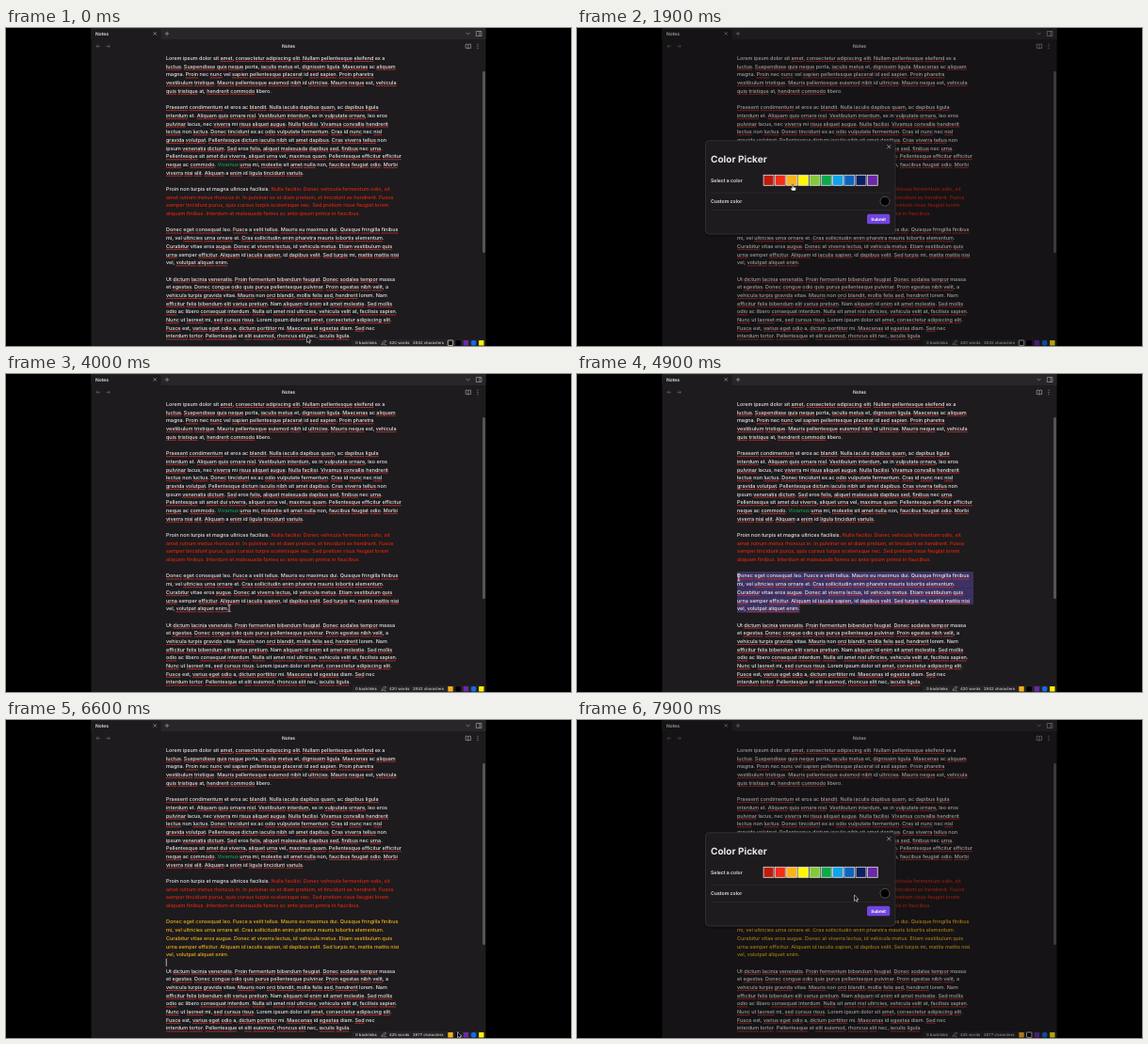
Recreate the animation shown at these times as an HTML page. Size 600x338 px, loop 8000 ms.

```html
<!DOCTYPE html>
<html lang="en">
<head>
<meta charset="utf-8">
<title>Notes</title>
<style>
html, body { margin: 0; width: 100%; height: 100%; overflow: hidden; background: #000; }
svg { display: block; width: 100vw; height: 100vh; }
text { font-family: Inter, "Open Sans", sans-serif; text-rendering: geometricPrecision; fill: #e8e6e8; }
.body { font-size: 5.45px; font-weight: 500; }
.ui { font-size: 4.9px; }
.status { font-size: 4.2px; font-weight: 500; fill: #d0ced0; }
.menu { font-size: 4.4px; font-weight: 500; }
.label { font-size: 5.15px; font-weight: 600; }
.icon { fill: none; stroke: #b4b2b5; stroke-width: .6; }
.spell { stroke: #d0322c; stroke-width: 1; stroke-dasharray: 1.2 .3; }
.done text { fill: #f2b01c; }
.done .spell { display: none; }
</style>
</head>
<body>
<svg id="stage" viewBox="0 0 600 338">
  <rect width="600" height="338" fill="#000"/>
  <rect x="90.5" width="419" height="338" fill="#1d1b1d"/>
  <rect x="90.5" width="419" height="12" fill="#292629"/>
  <path d="M90.5 12V2Q90.5 1 92 1H163Q164.5 1 164.5 3V12Z" fill="#1d1b1d"/>
  <text class="ui" x="95" y="7.9" font-weight="600">Notes</text>
  <text class="ui" x="300" y="21.2" text-anchor="middle" font-weight="600">Notes</text>
  <path class="icon" d="M156.5 4.2l3.4 3.4m0-3.4l-3.4 3.4M168.800 6h4.400M171 3.800v4.400M488.600 5l1.900 1.900L492.400 5M499.300 3.500h5.600v5h-5.600zM503 3.500v5"/>
  <path class="icon" d="M488.200 17.200q1.600-.5 2.700.5q1.100-1 2.700-.5v4.300q-1.600-.5-2.700.5q-1.100-1-2.700-.5zM490.900 17.700v4.300"/>
  <path class="icon" stroke-linecap="round" style="stroke-width:1" d="M501 17.200v0M501 19.400v0M501 21.600v0"/>
  <path class="icon" style="stroke:#777478" d="M100 19.400h-4m1.700-1.700l-1.700 1.700l1.700 1.700M106.300 19.400h4m-1.700-1.700l1.700 1.700l-1.700 1.700"/>
  <rect x="506" y="46" width="3" height="193" rx="1.2" fill="#565356"/>
  <g id="sel" fill="#3d3263"></g>
  <g id="plain"></g>
  <g id="para"></g>
  <rect id="caret" x="169.8" y="253.5" width=".8" height="8.3" fill="#dcdadc"/>
  <rect x="367" y="331" width="142.500" height="7" fill="#252225"/>
  <text class="status" x="371" y="336.3">0 backlinks</text>
  <path class="icon" d="M399 336.600l.5-1.700l3-3l1.200 1.200l-3 3zM401.500 336.700h2.400"/>
  <text class="status" id="words" x="407" y="336.3"></text>
  <text class="status" id="chars" x="432" y="336.3"></text>
  <g id="dock"></g>
  <g id="menu">
    <rect x="172.5" y="216.3" width="128" height="98" rx="2.5" fill="#29262d" fill-opacity=".95" stroke="#57535a" stroke-width=".5"/>
    <rect id="hot" x="173" width="127" height="8.7" rx="1" fill="#0b56cf"/>
  </g>
  <g id="modal">
    <rect x="90.5" width="419" height="338" fill="#060606" opacity=".32"/>
    <rect x="135.5" y="119" width="204" height="103" rx="5" fill="#000" opacity=".25"/>
    <rect x="136.5" y="119.7" width="201.5" height="99.3" rx="4" fill="#1d1b1d" stroke="#454246" stroke-width=".6"/>
    <path class="icon" style="stroke:#d0ced0" d="M329.300 124.200l4 4m0-4l-4 4"/>
    <text x="142" y="142.9" font-size="10.05" font-weight="700">Color Picker</text>
    <text class="label" x="142" y="163.8">Select a color</text>
    <text class="label" x="142" y="186.2">Custom color</text>
    <path d="M142 175.300H333M142 193.500H333" stroke="#363337" stroke-width=".5"/>
    <circle cx="327" cy="184.2" r="5" fill="#000" stroke="#59565a" stroke-width=".9"/>
    <rect x="308" y="197.8" width="24.3" height="10.5" rx="1.9" fill="#7145e0"/>
    <text x="320.1" y="204.7" font-size="4.5" font-weight="700" text-anchor="middle" style="fill:#fff">Submit</text>
  </g>
  <g id="cursor">
    <path d="M0 0V6.300L1.500 5L2.500 7.200L3.500 6.800L2.600 4.600H4.500Z" fill="#000" stroke="#fff" stroke-width=".55"/>
    <path d="M-.7 0Q0-.8.7 0V2.500L3.200 3.100Q3.800 3.400 3.600 4.300L3 6.500H-.7L-2.400 4.100Q-2.300 3.300-1.600 3.500L-.7 4.200Z" fill="#fff" stroke="#111" stroke-width=".5"/>
    <path d="M-1.500-3.500Q0-3.500 0-2.700Q0-3.500 1.500-3.500M0-2.700V2.700M-1.500 3.500Q0 3.500 0 2.700Q0 3.500 1.500 3.500" fill="none" stroke="#eee" stroke-width=".75"/>
  </g>
</svg>
<script>
const LOOP = 8000, LEFT = 170, RIGHT = 421, PITCH = 8.69;
const RED_FROM = 16, RED_TO = 19, PARA = 21, PARA_END = 25, ORANGE = '#f5b01c';
const $ = id => document.getElementById(id);
const rowTop = row => 27.6 + row * PITCH;

const lines = `Lorem ipsum dolor sit amet, consectetur adipiscing elit. Nullam pellentesque eleifend ex a
luctus. Suspendisse quis neque porta, iaculis metus et, dignissim ligula. Maecenas ac aliquam
magna. Proin nec nunc vel sapien pellentesque placerat id sed sapien. Proin pharetra
vestibulum tristique. Mauris pellentesque euismod nibh id ultricies. Mauris neque est, vehicula
quis tristique at, hendrerit commodo libero.

Praesent condimentum et eros ac blandit. Nulla iaculis dapibus quam, ac dapibus ligula
interdum et. Aliquam quis ornare nisl. Vestibulum interdum, ex in vulputate ornare, leo eros
pulvinar lacus, nec viverra mi risus aliquet augue. Nulla facilisi. Vivamus convallis hendrerit
lectus non luctus. Donec tincidunt ex ac odio vulputate fermentum. Cras id nunc nec nisl
gravida volutpat. Pellentesque dictum iaculis nibh sit amet dapibus. Cras viverra tellus non
ipsum venenatis dictum. Sed eros felis, aliquet malesuada dapibus sed, finibus nec urna.
Pellentesque sit amet dui viverra, aliquet urna vel, maximus quam. Pellentesque efficitur efficitur
neque ac commodo. |Vivamus| urna mi, molestie sit amet nulla non, faucibus feugiat odio. Morbi
viverra nisi elit. Aliquam a enim id ligula tincidunt variuls.

Proin non turpis et magna ultrices facilisis. |Nulla facilisi. Donec vehicula fermentum odio, sit
|amet rutrum metus rhoncus in. In pulvinar ex et diam pretium, et tincidunt ex hendrerit. Fusce
|semper tincidunt purus, quis cursus turpis scelerisque nec. Sed pretium risus feugiat lorem
|aliquam finibus. Interdum et malesuada fames ac ante ipsum primis in faucibus.

Donec eget consequat leo. Fusce a velit tellus. Mauris eu maximus dui. Quisque fringilla finibus
mi, vel ultricies urna ornare et. Cras sollicitudin enim pharetra mauris lobortis elementum.
Curabitur vitae eros augue. Donec at viverra lectus, id vehicula metus. Etiam vestibulum quis
urna semper efficitur. Aliquam id iaculis sapien, id dapibus velit. Sed turpis mi, mattis mattis nisi
vel, volutpat aliquet enim.

Ut dictum lacinia venenatis. Proin fermentum bibendum feugiat. Donec sodales tempor massa
et egestas. Donec congue odio quis purus pellentesque pulvinar. Proin egestas nibh velit, a
vehicula turpis gravida vitae. Mauris non orci blandit, mollis felis sed, hendrerit lorem. Nam
efficitur felis bibendum elit varius pretium. Nam aliquam id enim sit amet molestie. Sed mollis
odio ac libero consequat interdum. Nulla sit amet nisl ultricies, vehicula velit at, facilisis sapien.
Nunc ut laoreet mi, sed cursus risus. Lorem ipsum dolor sit amet, consectetur adipiscing elit.
Fusce est, varius eget odio a, dictum porttitor mi. Maecenas id egestas diam. Sed nec
interdum tortor. Pellentesque et elit euismod, rhoncus elit nec, iaculis ligula.`.split('\n');
const known = new Set('lorem ipsum dolor sit a at et in id ex ac ut non leo eros magna est mi vel nec porta lacus libero semper diam ante primis vitae massa nam'.split(' '));

function add(parent, tag, attrs = {}, text) {
  const el = document.createElementNS('http://www.w3.org/2000/svg', tag);
  for (const k in attrs) el.setAttribute(k, attrs[k]);
  if (text) el.textContent = text;
  return parent.appendChild(el);
}

lines.forEach((line, row) => {
  if (!line) return;
  const parent = $(row >= PARA && row <= PARA_END ? 'para' : 'plain');
  const red = row >= RED_FROM && row <= RED_TO;
  const y = 34 + row * PITCH;
  const text = add(parent, 'text', { class: 'body', x: LEFT, y });
  let from = 0;
  const marks = [];
  line.split('|').forEach((part, i) => {
    if (!part) return;
    const span = add(text, 'tspan', {}, part);
    if (i % 2) span.style.fill = red ? '#e0240e' : '#12a152';
    else if (!red) for (const m of part.matchAll(/\w+/g))
      if (!known.has(m[0].toLowerCase())) marks.push([from + m.index, from + m.index + m[0].length - 1]);
    from += part.length;
  });
  for (const [a, b] of marks) add(parent, 'line', {
    class: 'spell', y1: y + 1.5, y2: y + 1.5,
    x1: text.getStartPositionOfChar(a).x, x2: text.getEndPositionOfChar(b).x
  });
});

const bars = [];
for (let r = PARA; r <= PARA_END; r++) bars.push(add($('sel'), 'rect', { y: rowTop(r), height: PITCH + .05 }));

const dock = ['#000', '#000', '#6a2aa6', '#1668e8', '#fff200'].map((fill, i) =>
  add($('dock'), 'rect', { x: 469.3 + i * 8.2, y: 332, width: 5.4, height: 5.4, rx: i == 3 ? 1.7 : .5, fill, 'stroke-width': .8 }));

['#bd1c0c', '#f62c13', '#fbb417', '#fff800', '#82c93c', '#0fa84c', '#0da6ea', '#0c66bd', '#0c1f60', '#6a28a4'].forEach((fill, i) =>
  add($('modal'), 'rect', { x: 198.1 + i * 12.25, y: 156.3, width: 10.9, height: 11, fill, stroke: '#e4e0e4', 'stroke-width': .8 }));

const items = [
  [221.5, 'Look up “Donec eget consequat leo. Fusce a velit...”'],
  [233, 'Cut'], [241, 'Copy'], [249, 'Paste'], [257, 'Paste as plain text'], [265, 'Select all'],
  [277, 'Bookmark this block...'], [285, 'Extract current selection...'],
  [297, 'Search for “Donec eget consequat leo. Fusce a velit...”'], [308.7, 'Color Text']
];
for (const [y, label] of items) add($('menu'), 'text', { class: 'menu', x: 177, y: y + 1.6 }, label);
for (const y of [227.3, 271, 291, 303]) add($('menu'), 'path', { d: `M176 ${y}H297`, stroke: '#4b474f', 'stroke-width': .5 });

// time, x, y
const path = [
  [0, 319.5, 328], [100, 319.5, 328], [780, 472, 333], [1000, 472, 333], [1700, 229, 166.5],
  [1950, 229, 166.5], [2600, 321, 202], [3200, 323, 202], [3400, 323, 202], [3950, 237, 249],
  [4050, 237, 249], [4500, 171.8, 216.5], [5000, 171.8, 216.5], [5500, 196, 308],
  [5700, 196, 308], [5800, 313, 291], [6500, 479.5, 331.5], [7300, 479.5, 332],
  [7750, 294.5, 186], [LOOP, 294.5, 186]
];
// time, shape: 0 arrow, 1 hand, 2 text beam
const shapes = [[0, 0], [1650, 1], [2000, 0], [2500, 1], [2800, 2], [5000, 0]];

function pointer(t) {
  const i = path.findIndex(p => p[0] > t), [a, x, y] = path[i - 1], [b, X, Y] = path[i];
  const u = (t - a) / (b - a), e = u * u * (3 - 2 * u);
  return [x + (X - x) * e, y + (Y - y) * e];
}
const show = (el, on) => { el.style.display = on ? '' : 'none'; };

function drawSelection(t, x, y) {
  const on = t >= 4050 && t < 5850;
  show($('sel'), on);
  if (!on) return;
  const top = t > 4500 ? PARA : Math.max(PARA, Math.min(PARA_END, Math.floor((y - 27.6) / PITCH)));
  bars.forEach((bar, i) => {
    const row = PARA + i, end = row == PARA_END ? 236.7 : RIGHT;
    const start = row == top && t <= 4500 ? Math.max(LEFT, x) : LEFT;
    bar.setAttribute('x', start);
    bar.setAttribute('width', row < top ? 0 : Math.max(0, end - start));
  });
}

function drawMenu(t, y) {
  show($('menu'), t >= 5000 && t < 5870);
  const at = t >= 5500 ? 308.7 : y;
  const item = items.find(([c]) => Math.abs(c - at) < 4.3);
  show($('hot'), item && at > 218);
  if (item) $('hot').setAttribute('y', item[0] - 4.3);
}

function render(t) {
  const [x, y] = pointer(t), done = t >= 5870;
  const open = t >= 1000 && t < 2800 || t >= 7300;
  drawSelection(t, x, y);
  drawMenu(t, y);
  show($('modal'), open);
  show($('caret'), done && !open);
  $('para').setAttribute('class', done ? 'done' : '');
  $('words').textContent = (done ? 425 : 420) + ' words';
  $('chars').textContent = (done ? 2877 : 2842) + ' characters';
  dock[0].setAttribute('fill', t < 2800 ? '#000' : ORANGE);
  dock[0].setAttribute('stroke', t < 2800 ? '#e8e6e8' : 'none');
  dock[1].setAttribute('stroke', t >= 7300 ? '#e8e6e8' : 'none');
  const shape = shapes.filter(s => s[0] <= t).pop()[1];
  [...$('cursor').children].forEach((el, i) => show(el, i == shape));
  $('cursor').setAttribute('transform', `translate(${x} ${y})`);
}

function tick() {
  render(performance.now() % LOOP);
  requestAnimationFrame(tick);
}
tick();
</script>
</body>
</html>
```
